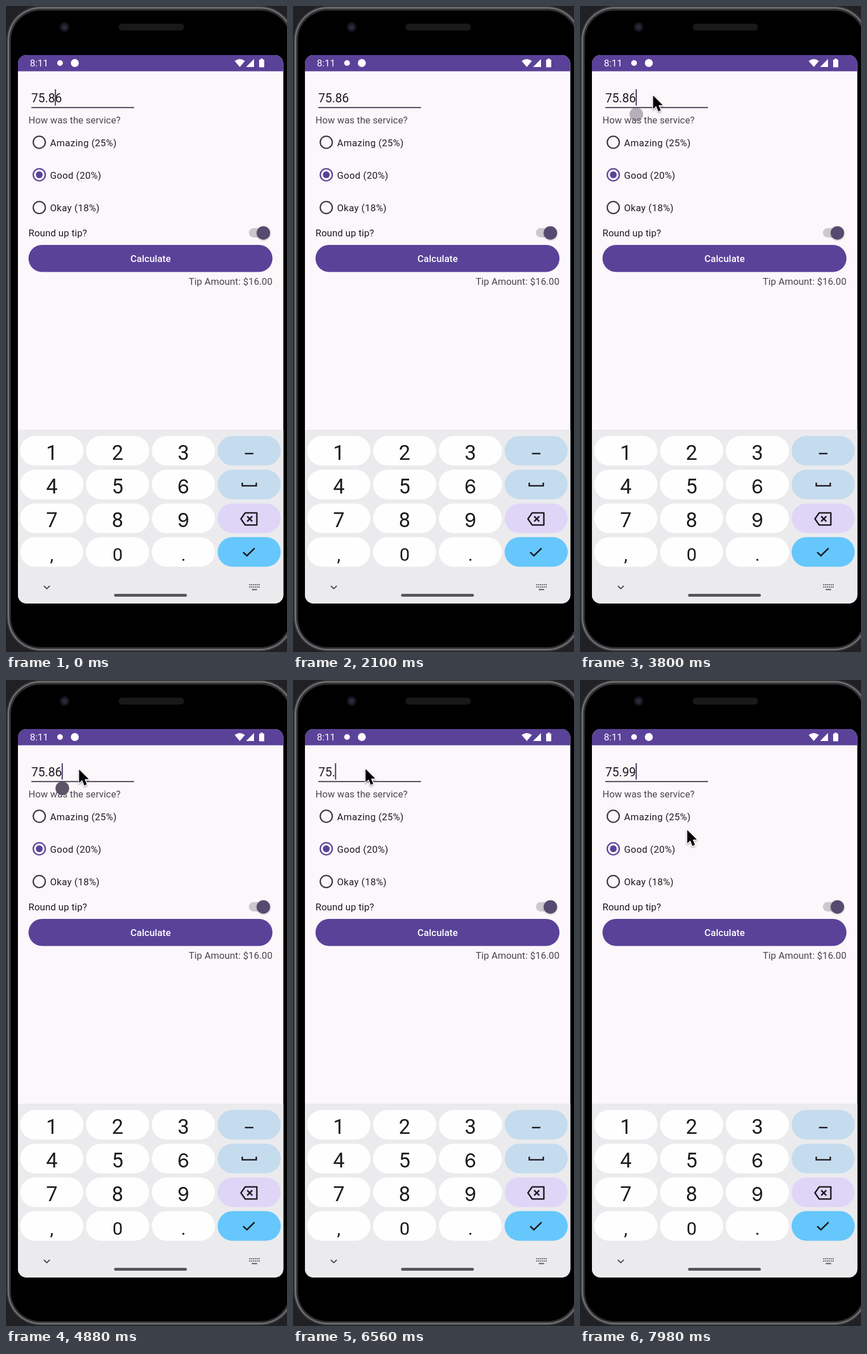
Write an HTML page with a canvas that moves like this. It is 494 px wide and 1133 px high and loops after 8 s.

```html
<!DOCTYPE html>
<html lang="en">
<head>
<meta charset="utf-8">
<title>Tip calculator</title>
<style>
  html, body { margin: 0; width: 100%; height: 100%; overflow: hidden; background: #202025; }
  canvas { display: block; }
</style>
</head>
<body>
<canvas id="stage" width="494" height="1133"></canvas>
<script>
const ctx = document.getElementById('stage').getContext('2d');
const LOOP = 8000;
const PURPLE = '#5a4299', INK = '#1d1b20';
const KEYS = ['1', '2', '3', '4', '5', '6', '7', '8', '9', ',', '0', '.'];
const SIDE = ['#c5dcee', '#c5dcee', '#dfd6f7', '#66c7fc'];

// Field contents over time: [start, text, caret index]
const EDITS = [
  [-450, '75.86', 4],
  [3600, '75.86', 5],
  [5700, '75.8', 4],
  [6100, '75.', 3],
  [7200, '75.9', 4],
  [7600, '75.99', 5]
];

// Pointer path: [time, x, y]
const POINTER = [
  [2500, 496, 300], [2740, 127, 163], [3000, 127, 163], [3300, 128, 155],
  [5200, 128, 155], [5600, 127, 154], [7620, 127, 154], [7920, 188, 261]
];

function box(x, y, w, h, r, color) {
  ctx.beginPath();
  ctx.roundRect(x, y, w, h, r);
  ctx.fillStyle = color;
  ctx.fill();
}

function disc(x, y, r, color) {
  ctx.beginPath();
  ctx.arc(x, y, r, 0, Math.PI * 2);
  ctx.fillStyle = color;
  ctx.fill();
}

function trace(points, close) {
  ctx.beginPath();
  points.forEach(([x, y]) => ctx.lineTo(x, y));
  if (close) ctx.closePath();
}

function line(points, width, color = INK, close = false) {
  trace(points, close);
  ctx.strokeStyle = color;
  ctx.lineWidth = width;
  ctx.stroke();
}

function shape(points, color) {
  trace(points, true);
  ctx.fillStyle = color;
  ctx.fill();
}

function text(str, x, y, { size = 16.7, color = INK, align = 'left', weight = 400, gap = 0, face = 'Roboto' } = {}) {
  ctx.font = `${weight} ${size}px ${face}, sans-serif`;
  ctx.letterSpacing = gap + 'px';
  ctx.textAlign = align;
  ctx.fillStyle = color;
  ctx.fillText(str, x, y);
}

function drawPhone() {
  ctx.fillStyle = '#202025';
  ctx.fillRect(0, 0, 494, 1133);
  box(1, 0, 506, 1132, 60, '#3a3a3d');
  box(3, 2, 502, 1128, 58, '#747477');
  box(5.5, 4.5, 497, 1123, 55, '#323234');
  box(8.5, 8, 491, 1116.5, 52, '#000');
  disc(103, 37, 8.5, '#15151b');
  disc(103, 37, 4.5, '#2a2a3c');
  box(198, 31, 115, 12, 6, '#19191b');
}

function drawStatus() {
  ctx.fillStyle = PURPLE;
  ctx.fillRect(21, 86, 467, 28.5);
  text('8:11', 42, 106.3, { size: 16.8, color: '#fff' });
  disc(95, 100, 5, '#fff');
  disc(121, 100, 7, '#fff');
  ctx.beginPath();
  ctx.moveTo(411, 107);
  ctx.lineTo(402, 96.5);
  ctx.quadraticCurveTo(411, 89.5, 420, 96.5);
  ctx.fillStyle = '#fff';
  ctx.fill();
  shape([[422, 107], [436, 107], [436, 93]], '#fff');
  box(445, 94, 9, 13.5, 1.2, '#fff');
  box(447.5, 92.3, 4, 3, 0.5, '#fff');
}

function drawRadio(y, label, on) {
  const color = on ? PURPLE : '#403b45';
  ctx.beginPath();
  ctx.arc(58.5, y, 10.6, 0, Math.PI * 2);
  ctx.strokeStyle = color;
  ctx.lineWidth = 2.4;
  ctx.stroke();
  if (on) disc(58.5, y, 6, color);
  text(label, 77.5, y + 6.5, { gap: 0.38 });
}

function drawForm() {
  text('How was the service?', 39.5, 205.5, { color: '#49454f', gap: 0.05 });
  drawRadio(239, 'Amazing (25%)', false);
  drawRadio(296, 'Good (20%)', true);
  drawRadio(353.5, 'Okay (18%)', false);

  text('Round up tip?', 39.5, 404.3, { gap: 0.14 });
  box(427, 389.5, 36, 16.5, 8.2, '#cdc8cf');
  ctx.save();
  ctx.shadowColor = 'rgba(0,0,0,.3)';
  ctx.shadowBlur = 3;
  ctx.shadowOffsetY = 1;
  disc(452.5, 398, 11.8, '#564a70');
  ctx.restore();

  box(39.5, 419, 429, 47.5, 23.75, PURPLE);
  text('Calculate', 254.3, 449, { color: '#fff', align: 'center', weight: 500, gap: 0.12 });
  text('Tip Amount: $16.00', 468.5, 489.3, { color: '#49454f', align: 'right', gap: 0.08 });
}

function drawKeyboard() {
  ctx.fillStyle = '#ebebee';
  ctx.fillRect(21, 743, 467, 305);
  const rowY = r => 754 + r * 59.2;
  KEYS.forEach((key, i) => {
    const x = 25 + (i % 3) * 115.7, y = rowY(Math.floor(i / 3));
    box(x, y, 111, 52, 26, '#fefefe');
    const face = key === '6' || key === '9' ? 'Inter' : 'Roboto';
    const size = i > 8 ? 32 : face === 'Inter' ? 34 : 36;
    text(key, x + 55.5, y + 41.5, { size, face, align: 'center' });
  });
  SIDE.forEach((color, r) => box(372, rowY(r), 111, 52, 26, color));

  line([[420, 785], [435, 785]], 2.5);
  line([[415.3, 836], [415.3, 841.5], [440, 841.5], [440, 836]], 2.6);
  ctx.lineJoin = 'round';
  line([[413, 899.5], [420.5, 889], [441, 889], [441, 910.3], [420.5, 910.3]], 2.6, INK, true);
  ctx.lineJoin = 'miter';
  line([[424, 895], [433, 904]], 2.5);
  line([[433, 895], [424, 904]], 2.5);
  line([[417, 958], [423.5, 964.3], [437, 951]], 2.6);

  line([[66.5, 1017], [71.7, 1022], [77, 1017]], 1.9, '#49474e');
  ctx.fillStyle = '#5a5860';
  for (let i = 0; i < 12; i++) {
    ctx.fillRect(427.5 + (i % 6) * 3.3, 1014 + Math.floor(i / 6) * 4, 2, 2);
  }
  ctx.fillRect(432, 1022.5, 9.5, 2);
  box(190, 1031, 128, 5, 2.5, '#57555d');
}

function drawField(t) {
  const [start, value, caret] = EDITS.filter(e => e[0] <= t).pop();
  text(value, 44.5, 168.5, { size: 21.4 });
  const end = ctx.measureText(value.slice(0, caret)).width;
  ctx.fillStyle = '#5a5263';
  ctx.fillRect(44.5, 177, 180.5, 2.2);
  if ((t - start) % 1000 < 500) {
    ctx.fillStyle = '#55476f';
    ctx.fillRect(44 + end, 146, 2.3, 28.5);
  }
}

function drawHandle(t) {
  if (t < 3740 || t >= 5700) return;
  ctx.save();
  ctx.globalAlpha = Math.min(1, (t - 3740) / 140);
  disc(99, 190, 12, '#5d5369');
  ctx.restore();
}

function pointerAt(t) {
  const i = POINTER.findIndex(p => p[0] > t);
  if (i === 0) return null;
  if (i < 0) return POINTER[POINTER.length - 1].slice(1);
  const [t0, x0, y0] = POINTER[i - 1], [t1, x1, y1] = POINTER[i];
  const k = (t - t0) / (t1 - t0), e = k * k * (3 - 2 * k);
  return [x0 + (x1 - x0) * e, y0 + (y1 - y0) * e];
}

function drawPointer(t) {
  const at = pointerAt(t);
  if (!at) return;
  ctx.save();
  ctx.translate(at[0] + 0.5, at[1] + 2);
  ctx.scale(0.9, 0.9);
  const arrow = [[0, 0], [0, 26], [6, 20.5], [10.3, 31], [15, 29], [10.8, 19], [18.8, 18.5]];
  ctx.shadowColor = 'rgba(0,0,0,.3)';
  ctx.shadowBlur = 3;
  ctx.shadowOffsetY = 2;
  ctx.lineJoin = 'round';
  line(arrow, 3, '#fff', true);
  ctx.shadowColor = 'transparent';
  shape(arrow, '#000');
  ctx.restore();
}

function draw(t) {
  drawPhone();
  ctx.save();
  ctx.beginPath();
  ctx.roundRect(21, 86, 466.5, 962, 15);
  ctx.clip();
  ctx.fillStyle = '#fcf7fa';
  ctx.fillRect(21, 86, 467, 962);
  drawStatus();
  drawField(t);
  drawForm();
  drawKeyboard();
  drawHandle(t);
  ctx.restore();
  drawPointer(t);
}

const began = performance.now();
function tick() {
  draw((performance.now() - began) % LOOP);
  requestAnimationFrame(tick);
}
tick();
</script>
</body>
</html>
```
